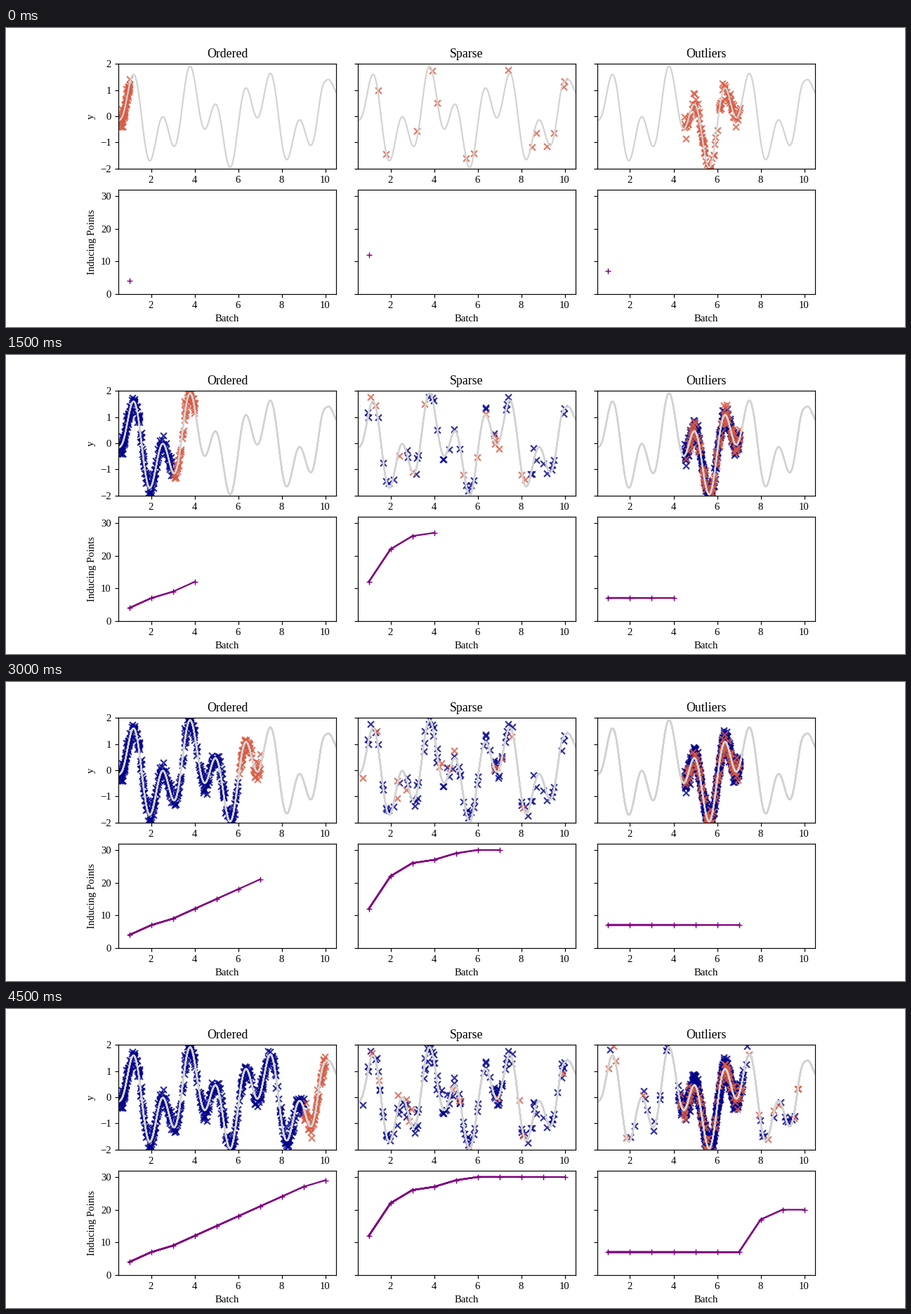
These frames come from a looping animation (1280x427 px, 5000 ms). A matplotlib script:

```python
import matplotlib.pyplot as plt
import numpy as np
from matplotlib.animation import FuncAnimation

DPI = 320 / 3
BATCHES = 10
RED, NAVY = "#d95b43", "darkblue"
rng = np.random.default_rng(7)

plt.rcParams.update({"font.family": "Liberation Serif", "font.size": 10})


def bump(x, height, centre, width):
    return height * np.exp(-((x - centre) / width) ** 2)


def curve(x):
    """Two waves, bent at the ends of the data as a fitted mean would be."""
    wave = np.sin(2 * x) + np.cos(5 * x)
    ends = bump(x, -.5, .35, .16) + bump(x, -.58, 10.06, .22) + bump(x, .85, 10.6, .22)
    return wave + ends + bump(x, -.08, 2.6, 1.6) + bump(x, -.2, 8.82, .4)


def sample(low, high, count):
    return rng.uniform(low, high, count)


def ordered(batch):
    return sample(max(batch - .97, .57), batch + .03, 60)


def sparse(batch):
    return sample(.5, 10, 14)


def outliers(batch):
    if batch <= 7:
        return sample(4.5, 7.05, 100)
    return np.r_[sample(4.2, 7.2, 75), sample(1, 9.8, 22)]


PANELS = [
    ("Ordered", ordered, [4, 7, 9, 12, 15, 18, 21, 24, 27, 29]),
    ("Sparse", sparse, [12, 22, 26, 27, 29] + [30] * 5),
    ("Outliers", outliers, [7] * 7 + [17, 20, 20]),
]

fig, axes = plt.subplots(2, 3, sharey="row", figsize=(1280 / DPI, 427 / DPI), dpi=DPI,
                         gridspec_kw={"wspace": .1, "hspace": .2})
xs = np.linspace(.5, 10.5, 500)
steps = np.arange(1, BATCHES + 1)
past, current, strokes = ([[] for _ in steps] for _ in range(3))

for (title, draw_x, counts), top, bottom in zip(PANELS, *axes):
    top.set(title=title, xlim=(.5, 10.5), ylim=(-2, 2), yticks=range(-2, 3))
    bottom.set(xlabel="Batch", xlim=(.5, 10.5), ylim=(0, 32), yticks=range(0, 31, 10))
    for i, batch in enumerate(steps):
        x = draw_x(batch)
        y = curve(x) + rng.normal(0, .2, x.size)
        past[i].append(top.scatter(x, y, marker="x", color=NAVY, alpha=.8, zorder=1))
        current[i].append(top.scatter(x, y, marker="x", color=RED, alpha=.8, zorder=1.5))
        # Lines are overdrawn once per batch, so older strokes look heavier.
        strokes[i] += top.plot(xs, curve(xs), color="lightgray")
        strokes[i] += bottom.plot(steps[:i + 1], counts[:i + 1], color="purple")
        strokes[i] += bottom.plot(batch, counts[i], "+", color="purple")

axes[0, 0].set_ylabel("y")
axes[1, 0].set_ylabel("Inducing Points")


def update(frame):
    for i in range(BATCHES):
        for group, shown in ((past, i < frame), (current, i == frame),
                             (strokes, i <= frame)):
            for artist in group[i]:
                artist.set_visible(shown)


anim = FuncAnimation(fig, update, frames=BATCHES, interval=500,
                     init_func=lambda: update(0), repeat=True, repeat_delay=0)
plt.show()
```
